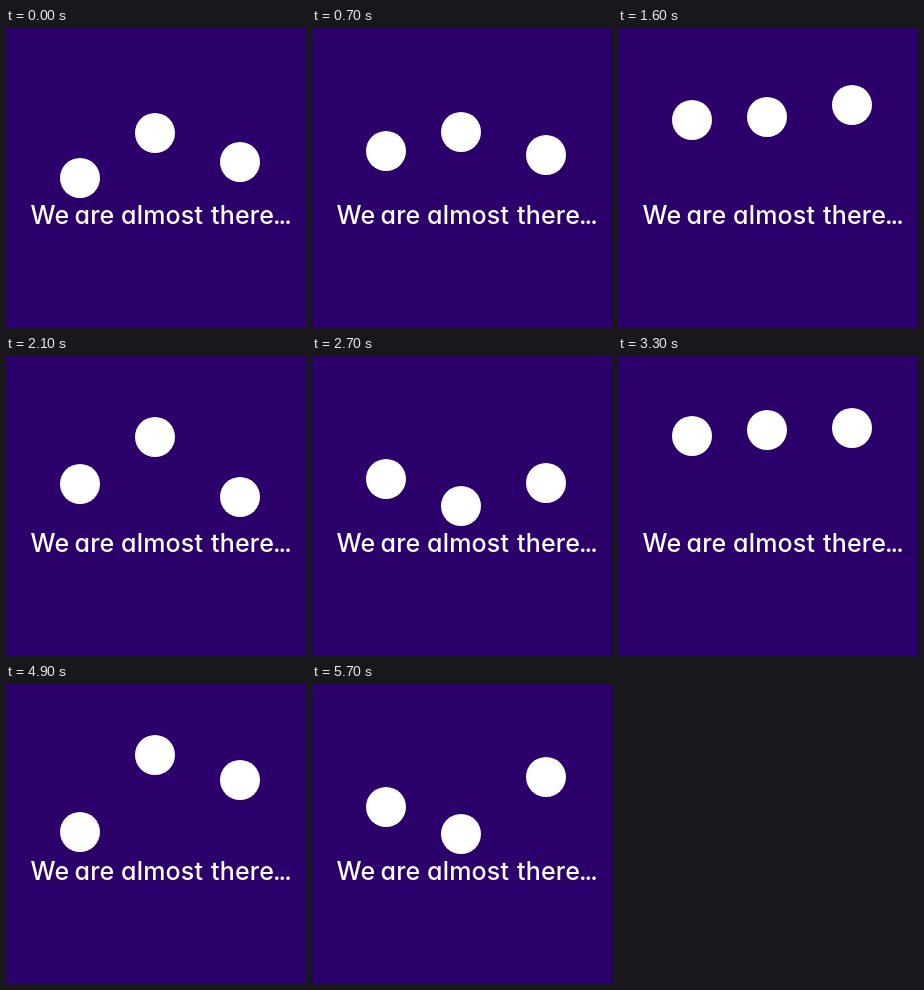
Animation of 300 by 300 pixels, one loop 5.8 s. Source, as an HTML page:

```html
<!DOCTYPE html>
<html lang="en">
<head>
<meta charset="utf-8">
<title>Almost there</title>
<style>
  html, body { margin: 0; width: 100%; height: 100%; overflow: hidden; background: #2c006b; }
  svg { display: block; width: 100%; height: 100%; }
  text { font: 450 25px Inter, "Open Sans", sans-serif; font-feature-settings: "cv11"; letter-spacing: .2px; }
  .dots { letter-spacing: -2px; }
</style>
</head>
<body>
<svg viewBox="0 0 300 300" fill="#fff">
  <circle cx="74" r="20"/>
  <circle cx="149" r="20"/>
  <circle cx="234" r="20"/>
  <text y="196"><tspan x="24.5">We</tspan> <tspan x="68.5">are</tspan> <tspan x="115">almost</tspan> <tspan x="205">there</tspan><tspan class="dots" x="267">...</tspan></text>
</svg>
<script>
const LOOP = 5800, STEP = 100, LEAD = 5;
const LOW = 150, HIGH = 70;
const circles = document.querySelectorAll('circle');
const bounces = [
  { period: 1000, offset: 0 },
  { period: 1500, offset: 250 },
  { period: 2000, offset: 1500 },
];

// The CSS "ease" curve: cubic-bezier(.25, .1, .25, 1)
function ease(x) {
  let lo = 0, hi = 1;
  for (let i = 0; i < 24; i++) {
    const s = (lo + hi) / 2;
    if (0.75 * s * (1 - s) + s ** 3 < x) lo = s; else hi = s;
  }
  const s = lo;
  return 0.3 * s * (1 - s) ** 2 + 3 * s * s * (1 - s) + s ** 3;
}

// Rises for half the period and falls for the other half, easing each way
function height(time, { period, offset }) {
  const phase = ((time + offset + period) % period) / period * 2;
  return phase < 1 ? ease(phase) : 1 - ease(phase - 1);
}

function render(time) {
  const moment = Math.floor((time % LOOP) / STEP) * STEP - LEAD;
  circles.forEach((circle, i) => {
    circle.setAttribute('cy', Math.round(LOW + (HIGH - LOW) * height(moment, bounces[i])));
  });
}

const start = performance.now();
function loop() {
  render(performance.now() - start);
  requestAnimationFrame(loop);
}
loop();
</script>
</body>
</html>
```
